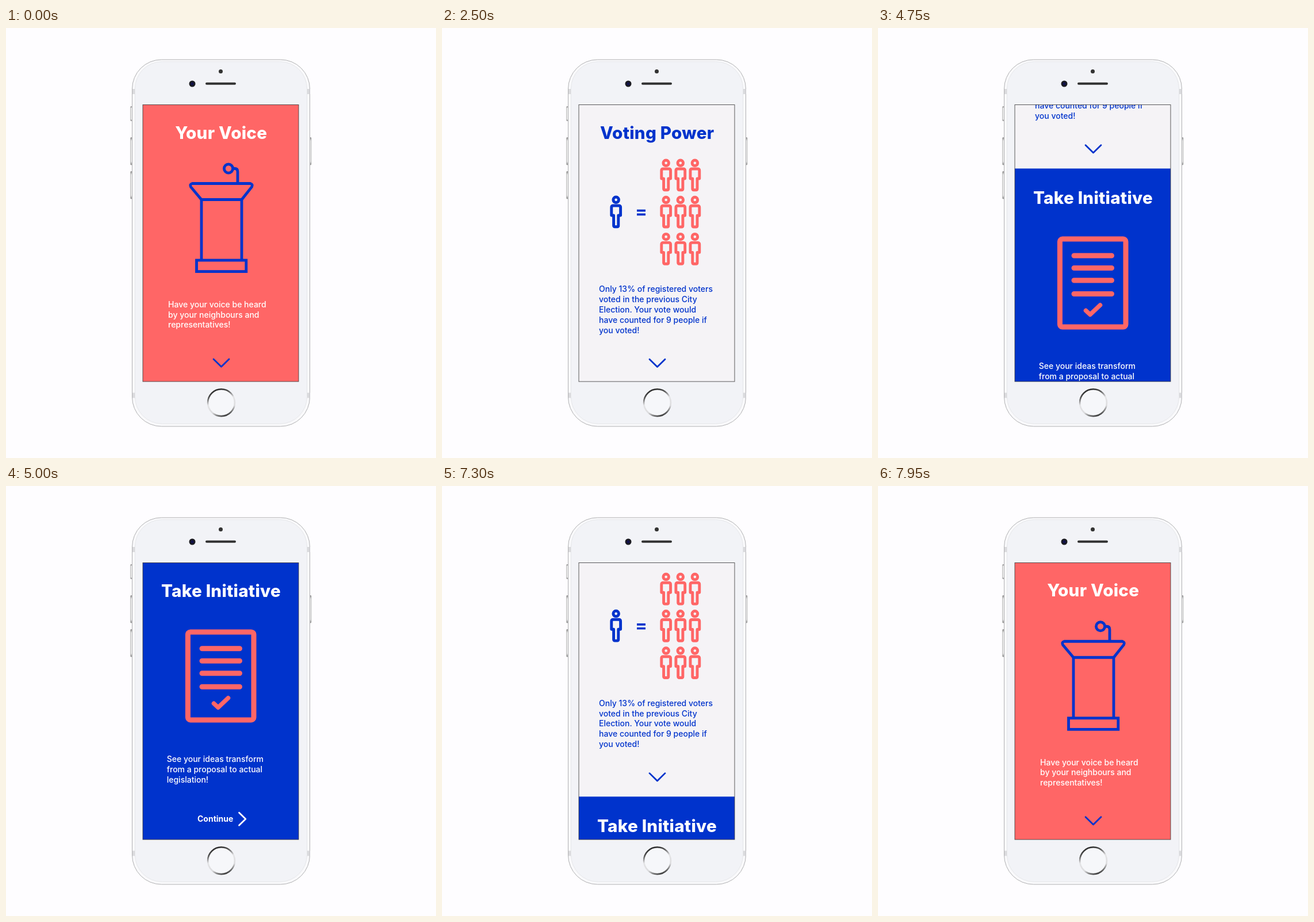
These frames come from a looping animation (748x748 px, 8000 ms). An HTML page:

```html
<!DOCTYPE html>
<html lang="en">
<head>
<meta charset="utf-8">
<title>Voting app intro</title>
<style>
  html, body { margin: 0; width: 100%; height: 100%; overflow: hidden; background: #fefdff; }
  svg { display: block; width: 100vw; height: 100vh; }
  text { font: 500 14px Inter, "Open Sans", sans-serif; font-optical-sizing: none; }
  .title { font-size: 29.6px; font-weight: 800; letter-spacing: .25px; text-anchor: middle; }
  .bold { font-weight: 700; }
  .line { fill: none; stroke-linecap: round; stroke-linejoin: round; }
  .white { fill: #fff; }
  .blue { fill: #0033cc; }
  .blue-line { stroke: #0033cc; }
  .red-line { stroke: #ff6666; }
</style>
</head>
<body>
<svg viewBox="0 0 748 748">
  <defs>
    <clipPath id="screen"><rect x="238" y="133.5" width="271" height="481.5"/></clipPath>
    <linearGradient id="ring" gradientUnits="userSpaceOnUse" x1="364" y1="628" x2="380" y2="676">
      <stop offset="0" stop-color="#222"/><stop offset=".22" stop-color="#555"/>
      <stop offset=".45" stop-color="#e4e4e6"/><stop offset=".75" stop-color="#dcdcde"/>
      <stop offset="1" stop-color="#333"/>
    </linearGradient>
    <linearGradient id="key" x2="0" y2="1">
      <stop offset="0" stop-color="#888"/><stop offset=".12" stop-color="#eee"/>
      <stop offset=".88" stop-color="#eee"/><stop offset="1" stop-color="#888"/>
    </linearGradient>
    <g id="person" class="line" stroke-width="4.9">
      <circle r="4.8"/>
      <path d="M-4.8 10.2H4.8Q7.9 10.2 7.9 13.3V27.2H4.1V45Q4.1 47 2.1 47H-2.1Q-4.1 47 -4.1 45V27.2H-7.9V13.3Q-7.9 10.2 -4.8 10.2Z"/>
    </g>
    <path id="down" class="line blue-line" stroke-width="2.8" d="M361 576L374.5 589.3L388 576"/>
  </defs>

  <g fill="url(#key)" stroke="#aaa" stroke-width=".8">
    <rect x="216.5" y="136.5" width="4" height="25" rx="1"/>
    <rect x="216.5" y="190.5" width="4" height="47.5" rx="1"/>
    <rect x="216.5" y="249.5" width="4" height="47.5" rx="1"/>
    <rect x="527" y="190.5" width="4" height="47.5" rx="1"/>
  </g>
  <rect x="219.5" y="55" width="309" height="638" rx="51" fill="#f9f9fb" stroke="#b0b0b2"/>
  <path d="M220 110.5H224.5M524 110.5H528.5M220 639H224.5M524 639H528.5" stroke="#dadadd" stroke-width="9"/>
  <rect x="224.5" y="58.5" width="299" height="630" rx="47" fill="#f2f3f7" stroke="#e6e7ea"/>
  <circle cx="373.5" cy="75.5" r="3.5" fill="#333"/>
  <circle cx="324" cy="97" r="5.5" fill="#1b1b22"/>
  <circle cx="324" cy="97" r="2.6" fill="#10104a"/>
  <rect x="347" y="94.7" width="53" height="4" rx="2" fill="#333"/>
  <circle cx="374.5" cy="651.7" r="23.4" fill="#f6f7fa" stroke="url(#ring)" stroke-width="2.6"/>

  <g clip-path="url(#screen)">
    <g class="page">
      <rect x="238" y="131" width="271" height="486" fill="#ff6666"/>
      <text class="title white" x="374.2" y="192.7">Your Voice</text>
      <g fill="none" class="blue-line" stroke-width="4.8">
        <circle cx="387" cy="244.5" r="7.6"/>
        <path d="M395 244.5H398Q403 244.5 403 250V270"/>
        <path d="M324 270.5H425Q430 272 427.5 276.5L410 298.5H340L321.5 276.5Q319 272 324 270.5Z"/>
        <path d="M340 298.5V404M410 298.5V404"/>
        <rect x="331.5" y="404" width="86.3" height="19.6"/>
      </g>
      <g class="white">
        <text x="282" y="486">Have your voice be heard</text>
        <text x="282" y="503.7">by your neighbours and</text>
        <text x="282" y="521.4">representatives!</text>
      </g>
      <use href="#down"/>
    </g>

    <g class="page">
      <rect x="238" y="131" width="271" height="486" fill="#f5f3f6"/>
      <text class="title blue" x="374.2" y="192.7">Voting Power</text>
      <use href="#person" class="blue-line" x="302.7" y="298.5"/>
      <path class="blue-line" stroke-width="3.6" d="M339 317.3H354M339 324.1H354"/>
      <g id="crowd" class="red-line"></g>
      <g class="blue">
        <text x="273" y="459.2">Only 13% of registered voters</text>
        <text x="273" y="477">voted in the previous City</text>
        <text x="273" y="494.8">Election. Your vote would</text>
        <text x="273" y="512.6">have counted for 9 people if</text>
        <text x="273" y="530.4">you voted!</text>
      </g>
      <use href="#down"/>
    </g>

    <g class="page">
      <rect x="238" y="131" width="271" height="486" class="blue"/>
      <text class="title white" x="374" y="192.9">Take Initiative</text>
      <g class="line red-line" stroke-width="9">
        <rect x="316.4" y="253.6" width="114.6" height="153" rx="4.5"/>
        <path d="M341 282.5H406.5M341 304H406.5M341 325.5H406.5M341 349H406.5"/>
        <path stroke-width="7.5" d="M361.5 378L369 385L386.5 368.5"/>
      </g>
      <g class="white">
        <text x="279.7" y="480">See your ideas transform</text>
        <text x="279.7" y="497.7">from a proposal to actual</text>
        <text x="279.7" y="515.4">legislation!</text>
        <text class="bold" x="333" y="583.5">Continue</text>
      </g>
      <path class="line" stroke="#fff" stroke-width="2.8" d="M405.5 568L416.8 579L405.5 590"/>
    </g>
  </g>
  <rect x="238" y="133.5" width="271" height="481.5" fill="none" stroke="#333" stroke-opacity=".8"/>
</svg>
<script>
const LOOP = 8000, STEP = 50, SLIDE = 500, PITCH = 485.7;
const slides = [
  { start: 2017, by: 1 },
  { start: 4517, by: 1 },
  { start: 7028, by: -1 },
  { start: 7465, by: -1 },
];
const pages = document.querySelectorAll('.page');

document.getElementById('crowd').innerHTML = Array.from({ length: 9 }, (_, i) =>
  `<use href="#person" x="${389.7 + (i % 3) * 25.1}" y="${234.5 + Math.floor(i / 3) * 64.2}"/>`).join('');

// cubic-bezier(.25, .1, .25, 1)
function ease(x) {
  if (x <= 0) return 0;
  if (x >= 1) return 1;
  let low = 0, high = 1, t;
  for (let i = 0; i < 24; i++) {
    t = (low + high) / 2;
    if (.75 * t - .75 * t * t + t ** 3 < x) low = t; else high = t;
  }
  return .3 * t + 2.4 * t * t - 1.7 * t ** 3;
}

function draw(now) {
  const time = Math.floor((now % LOOP) / STEP) * STEP;
  const scroll = slides.reduce((sum, s) => sum + s.by * ease((time - s.start) / SLIDE), 0);
  pages.forEach((page, i) => page.setAttribute('transform', `translate(0 ${(i - scroll) * PITCH})`));
}

const origin = performance.now();
function tick() {
  draw(performance.now() - origin);
  requestAnimationFrame(tick);
}
tick();
</script>
</body>
</html>
```
